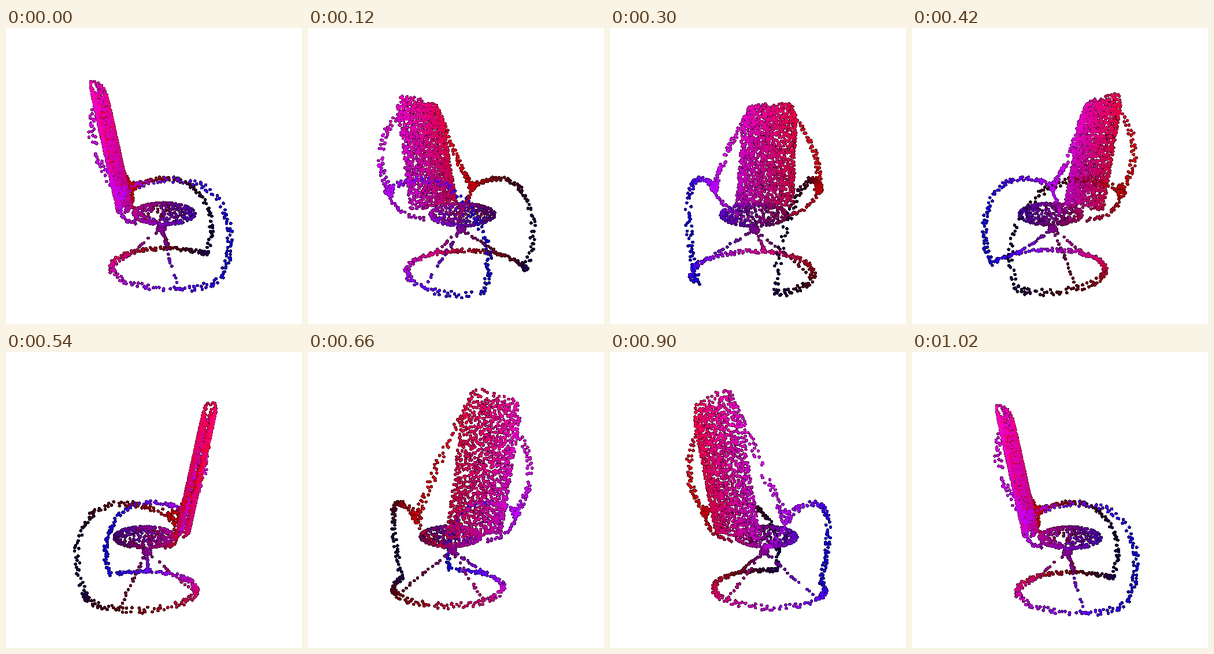
These frames come from a looping animation (512x512 px, 1.08 s). An HTML page with a canvas:

```html
<!DOCTYPE html>
<html lang="en">
<head>
<meta charset="utf-8">
<title>Rotating chair point cloud</title>
<style>
  html, body { margin: 0; width: 100%; height: 100%; overflow: hidden; background: #fff; }
  canvas { display: block; width: 512px; height: 512px; }
</style>
</head>
<body>
<canvas id="stage" width="512" height="512"></canvas>
<script>
const SIZE = 512, MID = SIZE / 2;
const FOCAL = 443;          // 60 degree field of view
const DOT = 2.9;            // dot radius in pixels
const STEP = 60, STEPS = 18;
const FLOOR = -152;

const ctx = document.getElementById('stage').getContext('2d');
const image = ctx.createImageData(SIZE, SIZE);
const points = [];

let seed = 20;
function rand() {
  seed = (seed + 0x6d2b79f5) | 0;
  let t = Math.imul(seed ^ (seed >>> 15), 1 | seed);
  t = (t + Math.imul(t ^ (t >>> 7), 61 | t)) ^ t;
  return ((t ^ (t >>> 14)) >>> 0) / 4294967296;
}
const spread = r => (rand() * 2 - 1) * r;

// Random direction
function unit() {
  const y = spread(1), a = rand() * Math.PI * 2, r = Math.sqrt(1 - y * y);
  return [r * Math.cos(a), y, r * Math.sin(a)];
}

const gap = (p, q) => Math.hypot(p[0] - q[0], p[1] - q[1], p[2] - q[2]);

// Loosely even random points: of three tries keep the one farthest from the rest.
function scatter(count, make) {
  const part = [];
  for (let i = 0; i < count; i++) {
    let best, far = -1;
    for (let k = 0; k < 3; k++) {
      const p = make();
      const near = part.reduce((m, q) => Math.min(m, gap(p, q)), 1e9);
      if (near > far) { far = near; best = p; }
    }
    part.push(best);
  }
  points.push(...part);
}

function ball(count, center, radii) {
  scatter(count, () => unit().map((n, c) => center[c] + n * radii[c]));
}

// Points around a curve given as a function of t in 0..1
function tube(curve, density, radius) {
  const line = Array.from({ length: 101 }, (_, i) => curve(i / 100));
  const sums = [0];
  for (let i = 1; i < line.length; i++) sums.push(sums[i - 1] + gap(line[i - 1], line[i]));
  const total = sums[sums.length - 1];
  scatter(Math.round(total * density), () => {
    const s = rand() * total, v = unit();
    const i = sums.findIndex(d => d > s);
    const t = (s - sums[i - 1]) / (sums[i] - sums[i - 1]);
    return v.map((n, c) => line[i - 1][c] + (line[i][c] - line[i - 1][c]) * t + n * radius);
  });
}

const line = (a, b) => t => a.map((v, c) => v + (b[c] - v) * t);

const bezier = (a, b, c, d) => t => {
  const u = 1 - t;
  return a.map((v, i) => u * u * u * v + 3 * u * u * t * b[i] + 3 * u * t * t * c[i] + t * t * t * d[i]);
};

function build() {
  // backrest: a thin padded panel leaning back, narrower at the top
  scatter(1150, () => {
    const y = -56 + rand() * 205;
    const half = 57 - 14 * Math.max(0, (y - 115) / 34) ** 2;
    const z = spread(half);
    const depth = 10 * Math.sqrt(1 - (z / half) ** 2);
    return [-62 - 0.22 * y + (rand() < 0.5 ? -depth : depth), y, z];
  });

  // seat cushion and hub
  const hub = [13, -90, 0];
  ball(270, [17, -64, 0], [53, 17, 56]);
  ball(20, hub, [7, 5, 7]);

  // floor loop, open at the front
  tube(t => {
    const a = (t * 2 - 1) * 2.5;
    return [25 - 97 * Math.cos(a), FLOOR, 97 * Math.sin(a)];
  }, 0.33, 3.8);

  for (const side of [1, -1]) {
    const at = (x, y, z) => [x, y, z * side];
    const joint = at(-45, -22, 102);
    // front leg bending back into the armrest
    tube(bezier(at(101, FLOOR, 57), at(135, -80, 55), at(95, 40, 98), joint), 0.33, 4);
    // armrest joint up to the backrest, and down to the seat
    tube(bezier(joint, at(-85, 20, 104), at(-95, 80, 88), at(-84, 112, 52)), 0.34, 4.5);
    tube(bezier(joint, at(-48, -55, 95), at(-45, -70, 65), at(-25, -72, 42)), 0.26, 2.5);
    ball(20, joint, [7, 9, 7]);
    tube(line(hub, at(32, FLOOR, 97)), 0.17, 1.5);
  }
  tube(line(hub, [-64, FLOOR, 0]), 0.17, 1.5);

  const level = v => 255 * Math.max(0, Math.min(1, v));
  for (const p of points) {
    p[2] += 2;
    p.red = level((125 - p[0]) / 225);
    p.blue = level((p[2] + 110) / 205);
  }
}

const red = new Float32Array(SIZE * SIZE);
const blue = new Float32Array(SIZE * SIZE);
const hit = new Uint8Array(SIZE * SIZE);

// Each dot fades towards its rim, over black.
function stamp(cx, cy, p) {
  for (let y = Math.floor(cy - DOT); y <= cy + DOT; y++) {
    for (let x = Math.floor(cx - DOT); x <= cx + DOT; x++) {
      const dx = x + 0.5 - cx, dy = y + 0.5 - cy;
      const q = (dx * dx + dy * dy) / (DOT * DOT);
      if (q >= 1 || x < 0 || y < 0 || x >= SIZE || y >= SIZE) continue;
      const i = y * SIZE + x, w = 0.88 * (1 - q * q);
      hit[i] = 1;
      red[i] += (p.red - red[i]) * w;
      blue[i] += (p.blue - blue[i]) * w;
    }
  }
}

function draw(step) {
  const angle = step / (STEPS - 1) * Math.PI * 2;
  const c = Math.cos(angle), s = Math.sin(angle);
  red.fill(0);
  blue.fill(0);
  hit.fill(0);
  points
    .map(p => ({ p, x: p[0] * c - p[2] * s, z: p[0] * s + p[2] * c }))
    .sort((a, b) => a.z - b.z)
    .forEach(({ p, x, z }) => {
      const scale = FOCAL / (FOCAL - z);
      stamp(MID + x * scale, MID - p[1] * scale, p);
    });
  const data = image.data;
  for (let i = 0; i < hit.length; i++) {
    const o = i * 4;
    data[o] = hit[i] ? red[i] : 255;
    data[o + 1] = hit[i] ? 0 : 255;
    data[o + 2] = hit[i] ? blue[i] : 255;
    data[o + 3] = 255;
  }
  ctx.putImageData(image, 0, 0);
}

let shown = -1;
function tick() {
  const step = Math.floor((performance.now() - start) / STEP) % STEPS;
  if (step !== shown) draw(shown = step);
  requestAnimationFrame(tick);
}

build();
const start = performance.now();
tick();
</script>
</body>
</html>
```
